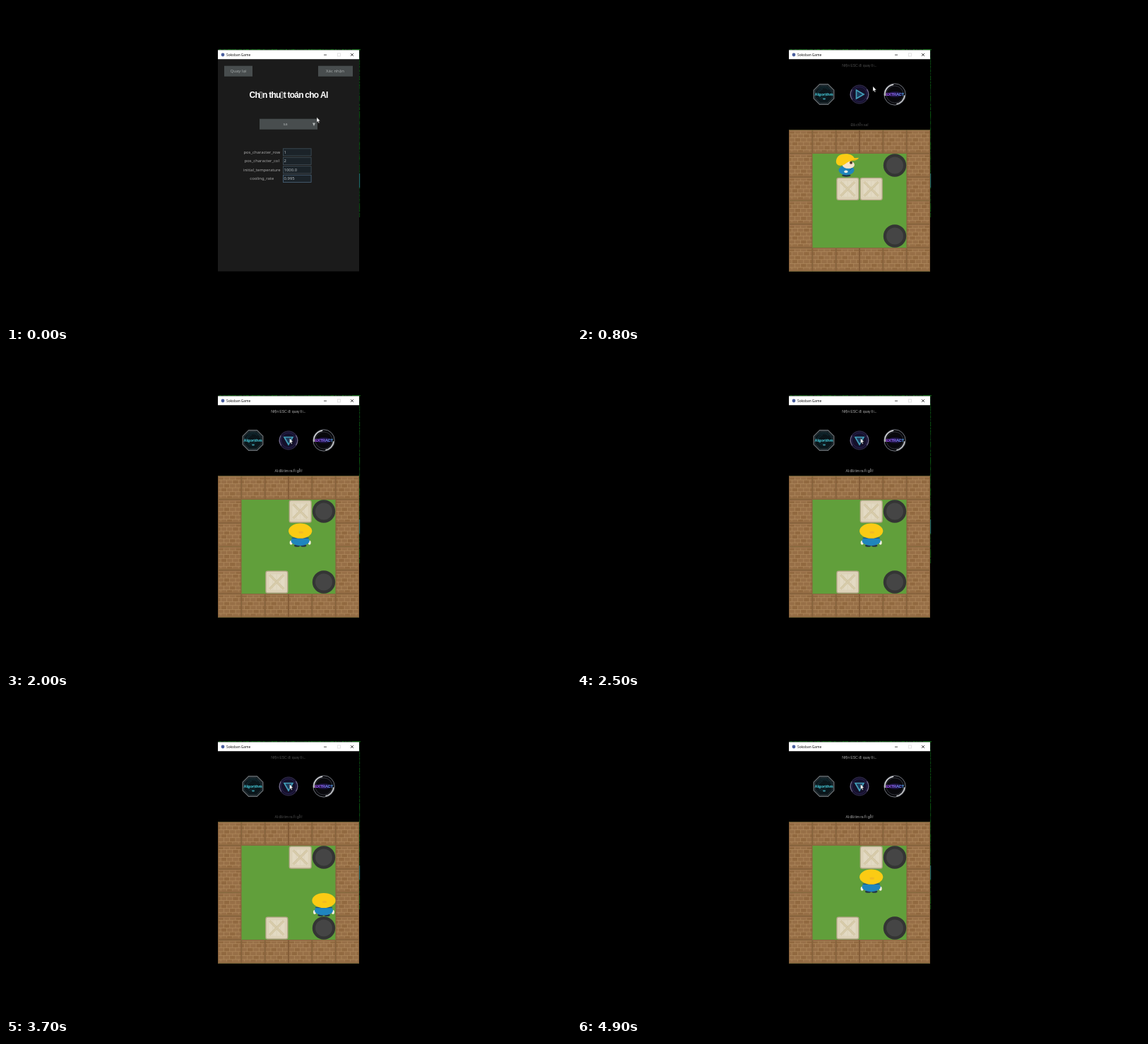
An HTML page with a canvas for the animation above (5000 ms loop, 800 px wide and 450 px high).

```html
<!DOCTYPE html>
<html lang="vi">
<head>
<meta charset="utf-8">
<title>Sokoban</title>
<style>
html, body { margin: 0; width: 100%; height: 100%; overflow: hidden; background: #000; }
canvas { display: block; }
</style>
</head>
<body>
<canvas id="stage" width="800" height="450"></canvas>
<script>
const c = document.getElementById('stage').getContext('2d');
const LOOP = 5000, TILE = 100 / 3, LEFT = 300, TOP = 175.5;
const UI = '"Noto Sans", sans-serif', ARIAL = '"Liberation Sans", Arial, sans-serif';
const GAME_AT = 500, PLAY_AT = 900, FIRST_MOVE = 925, MOVE_EVERY = 285;
const MOVES = 'DDRUDURDDUUDLU';
const DIRS = { U: [0, -1], D: [0, 1], L: [-1, 0], R: [1, 0] };
// time, x, y of the pointer tip
const POINTER = [[0, 440, 157.5], [350, 465, 91], [500, 465, 91], [800, 419, 113.7], [900, 401.5, 122]];

function rect(x, y, w, h, color) {
  c.fillStyle = color;
  c.fillRect(x, y, w, h);
}

function roundRect(x, y, w, h, r, color) {
  c.fillStyle = color;
  c.beginPath();
  c.roundRect(x, y, w, h, r);
  c.fill();
}

function ellipse(x, y, rx, ry, color, from = 0, to = 2 * Math.PI) {
  c.fillStyle = color;
  c.beginPath();
  c.ellipse(x, y, rx, ry, 0, from, to);
  c.fill();
}

function poly(points, fill, stroke, width = 1) {
  c.beginPath();
  points.forEach(([x, y]) => c.lineTo(x, y));
  c.closePath();
  if (fill) { c.fillStyle = fill; c.fill(); }
  if (stroke) { c.strokeStyle = stroke; c.lineWidth = width; c.stroke(); }
}

function line(x1, y1, x2, y2, color, width) {
  c.strokeStyle = color;
  c.lineWidth = width;
  c.beginPath();
  c.moveTo(x1, y1);
  c.lineTo(x2, y2);
  c.stroke();
}

function ring(x, y, r, color, width, from = 0, to = 2 * Math.PI) {
  c.strokeStyle = color;
  c.lineWidth = width;
  c.beginPath();
  c.arc(x, y, r, from, to);
  c.stroke();
}

function text(s, x, y, font, color, align = 'center') {
  c.font = font;
  c.fillStyle = color;
  c.textAlign = align;
  c.textBaseline = 'alphabetic';
  c.fillText(s, x, y);
}

// Centred text in which every ▯ is a missing-glyph box
function boxedText(s, x, y, size, weight, spacing, color) {
  const font = `${weight} ${size}px ${ARIAL}`, box = size * .34;
  c.font = font;
  c.letterSpacing = spacing + 'px';
  const parts = s.split('▯'), widths = parts.map(p => c.measureText(p).width);
  x -= (widths.reduce((a, b) => a + b) + box * (parts.length - 1)) / 2;
  parts.forEach((p, i) => {
    if (i) {
      c.strokeStyle = color;
      c.lineWidth = size * .05;
      c.strokeRect(x + .3, y - size * .7, box - 1, size * .7);
      x += box;
    }
    text(p, x, y, font, color, 'left');
    x += widths[i];
  });
  c.letterSpacing = '0px';
}

function windowFrame() {
  let seed = 7;
  const rnd = () => (seed = seed * 16807 % 2147483647) / 2147483647;
  for (let x = 300; x < 501; x += 2) rect(x, 61, 2, 1.5, `rgb(14,${35 + rnd() * 70},18)`);
  for (let y = 63; y < 298; y += 2) {
    const teal = y > 236 && y < 256;
    rect(500, y, 1.2, 2, teal ? '#1d6a66' : `rgb(8,${20 + rnd() * 60},14)`);
  }
  rect(300, 62.4, 200, 13.1, '#fff');
  ellipse(307, 69, 2.4, 2.4, '#4a5f9e');
  text('Sokoban Game', 312, 70.9, '4.8px ' + UI, '#111', 'left');
  line(450, 69.2, 454, 69.2, '#222', .8);
  c.strokeStyle = '#ddd';
  c.strokeRect(469.5, 67, 4, 4);
  line(488, 67, 492, 71, '#222', .8);
  line(492, 67, 488, 71, '#222', .8);
}

function button(s, x, y, w, textX) {
  rect(x, y, w, 15, '#484d4e');
  text(s, textX, y + 9.6, '6px ' + UI, '#a5abab');
}

function settings() {
  rect(300, 75.5, 200, 300, '#1b1b1b');
  button('Quay lại', 309, 84.7, 40, 329);
  button('Xác nhận', 442, 84.7, 49, 466);
  boxedText('Ch▯n thu▯t toán cho AI', 400, 130.3, 12, 'bold', -.76, '#fff');
  button('sa', 359, 159.7, 82, 395.5);
  poly([[434, 165.5], [438, 165.5], [436, 170]], '#b5baba');
  [['pos_character_row', '1'], ['pos_character_col', '2'],
   ['initial_temperature', '1000.0'], ['cooling_rate', '0.995']].forEach(([name, value], i) => {
    const y = 201.4 + i * 12.45;
    text(name, 362.3, y + 7.6, '5.9px ' + UI, '#a8a8a8');
    rect(392, y, 40.5, 11, i == 3 ? '#4d6880' : '#42505a');
    rect(392.8, y + .8, 38.9, 9.4, '#1b2329');
    text(value, 393.6, y + 7.6, '5.9px ' + UI, '#b5bcc0', 'left');
  });
}

function icons(playing) {
  const octagon = r => Array.from({ length: 8 }, (_, i) => {
    const a = (i + .5) * Math.PI / 4;
    return [349.5 + r * Math.cos(a), 125 + r * Math.sin(a)];
  });
  poly(octagon(15.4), '#0a151a', '#63686c', 1.4);
  poly(octagon(13.2), null, '#2d373c', 1);
  for (let i = 0; i < 5; i++) ring(349.5, 125, 4 + i * 1.8, '#1b434c', .5, i, i + 2.5);
  text('Algorithm', 349.6, 127, `bold 5.5px ${ARIAL}`, '#49d3e2');
  ellipse(350, 131.5, 2, 1, '#3f9ba8');

  ellipse(400, 125, 13.4, 13.4, '#14102a');
  ring(400, 125, 12.8, '#2c2742', 1.2);
  ring(400, 125, 12.6, '#777090', 1.1, -.6, .6);
  ring(400, 125, 12.6, '#777090', 1.1, 2.5, 3.7);
  ring(400, 125, 10.5, '#2a2252', 1);
  c.save();
  c.translate(400, 125);
  if (playing) c.rotate(Math.PI / 2);
  poly([[-4.5, -6], [6, 0], [-4.5, 6]], '#1c3a5c', '#439fb8', 1.7);
  c.restore();

  ellipse(450, 125, 15.8, 15.8, '#08080c');
  ring(450, 125, 15.2, '#70747a', 1);
  ring(450, 125, 14, '#d5d7db', 1.6, -3.3, -1.7);
  ring(450, 125, 14, '#c8cace', 1.6, .1, 1.4);
  ring(450, 125, 12, '#34363e', .9);
  const glow = c.createLinearGradient(438, 0, 462, 0);
  glow.addColorStop(0, '#a64af0');
  glow.addColorStop(.5, '#8a6cf8');
  glow.addColorStop(1, '#4fa8f0');
  ellipse(450, 125, 11, 4, '#1d1440');
  c.letterSpacing = '-.4px';
  text('EXTRACT', 450, 127.2, `bold 6px ${ARIAL}`, glow);
  c.letterSpacing = '0px';
}

function wall(x, y) {
  c.save();
  c.beginPath();
  c.rect(x, y, TILE, TILE);
  c.clip();
  rect(x, y, TILE, TILE, '#ae885c');
  const h = TILE / 6, w = TILE / 4;
  for (let r = 0; r < 6; r++)
    for (let i = -1; i < 5; i++)
      rect(x + (i + r % 2 / 2) * w + .4, y + r * h + .4, w - .8, h - .8, (r + i) % 3 ? '#976f47' : '#916940');
  c.strokeStyle = '#815b38';
  c.lineWidth = 1.8;
  c.strokeRect(x, y, TILE, TILE);
  rect(x + 1, y + 1, TILE - 2, 1.4, '#a07850');
  rect(x + 1, y + TILE - 2.6, TILE - 2, 1.7, '#936c44');
  c.restore();
}

function crate(col, row) {
  const x = LEFT + col * TILE + .6, y = TOP + row * TILE + .6, s = 32.2;
  roundRect(x, y, s, s, 3.2, '#b3a687');
  roundRect(x + 1.3, y + 1.3, s - 2.6, s - 2.6, 2.2, '#ddd2b8');
  rect(x + 5, y + 5, s - 10, s - 10, '#e3dac3');
  for (let i = 1; i < 4; i++) line(x + 5 + i * 5.5, y + 5, x + 5 + i * 5.5, y + s - 5, '#dad0b7', .7);
  for (const [a, b] of [[6, 26], [26, 6]]) {
    line(x + a, y + 6, x + b, y + 26, '#cdc19f', 3.2);
    line(x + a, y + 6, x + b, y + 26, '#d8ccab', 2);
  }
}

function goal(col, row) {
  const x = LEFT + (col + .5) * TILE, y = TOP + (row + .5) * TILE;
  ellipse(x, y, 16.2, 16.2, '#343534');
  ellipse(x, y, 12, 12, '#454545');
}

function sideCap() {
  c.fillStyle = '#fbcb14';
  c.beginPath();
  c.moveTo(-16.5, 11);
  c.bezierCurveTo(-16, 3, -10, .3, -3, .3);
  c.bezierCurveTo(4, .3, 8, 3, 9.5, 6.5);
  c.lineTo(15.5, 6);
  c.bezierCurveTo(14.5, 10, 8, 10, 3, 11);
  c.bezierCurveTo(-2, 12.5, -4, 17, -10, 17);
  c.bezierCurveTo(-14, 17, -16.5, 15, -16.5, 11);
  c.fill();
}

function worker(col, row, dir) {
  c.save();
  c.translate(LEFT + (col + .5) * TILE, TOP + row * TILE);
  if (dir == 'L') c.scale(-1, 1);
  if (dir == 'L' || dir == 'R') {
    ellipse(-2, 30.8, 6.2, 2.1, '#24384a');
    ellipse(-1.8, 23.5, 11, 6.8, '#1f85bd');
    ellipse(1, 15.8, 8.6, 5.4, '#f6e3ca');
    sideCap();
    ellipse(4.7, 13, 2, 2, '#4a3a2c');
    line(4, 10.3, 14, 7.5, '#e0a214', .9);
    ellipse(-2.5, 25.5, 2.6, 1.9, '#f0eee6');
    line(1.5, 25, 6, 20.5, '#175d8c', 1);
  } else {
    ellipse(-4.5, 31.8, 4.2, 1.8, '#24384a');
    ellipse(4.5, 31.8, 4.2, 1.8, '#24384a');
    ellipse(-13, 27.5, 2, 3, '#f5efe2');
    ellipse(13, 27.5, 2, 3, '#f5efe2');
    ellipse(0, 25, 13, 7, '#1f85bd');
    if (dir == 'D') {
      ellipse(0, 17, 11, 6.5, '#f6dfc3');
      ellipse(-4, 17, 1.5, 2, '#35302d');
      ellipse(4, 17, 1.5, 2, '#35302d');
      ellipse(0, 11, 15, 10.5, '#fbcb14', Math.PI, 2 * Math.PI);
      ellipse(0, 11.5, 16, 3.4, '#f0bb10');
    } else {
      line(-12, 21, 12, 21, '#24506e', 1.2);
      ellipse(0, 11, 16.6, 10.6, '#fbcb14');
      ellipse(1, 13, 3.2, 1.6, '#f2ba22');
    }
  }
  c.restore();
}

function boardAt(t) {
  const man = { x: 2, y: 1, dir: 'R' }, crates = [[2, 2], [3, 2]];
  const count = Math.floor((t - FIRST_MOVE) / MOVE_EVERY) + 1;
  for (const dir of MOVES.slice(0, Math.max(0, count))) {
    const [dx, dy] = DIRS[dir];
    man.x += dx;
    man.y += dy;
    man.dir = dir;
    const hit = crates.find(([x, y]) => x == man.x && y == man.y);
    if (hit) { hit[0] += dx; hit[1] += dy; }
  }
  return { man, crates };
}

function game(t) {
  rect(300, 75.5, 200, 100, '#000');
  const pulse = .5 - .5 * Math.cos((t - 800) / 2900 * 2 * Math.PI);
  const grey = 75 + 95 * Math.min(1, pulse * 1.6), color = `rgb(${grey},${grey},${grey})`;
  boxedText('Nh▯n ESC đ▯ quay l▯i...', 399.7, 86.2, 5.3, 'normal', -.2, color);
  boxedText(t < PLAY_AT ? 'Đã ch▯n sa!' : 'AI đã tìm ra l▯i gi▯i!', 400, 169.5, 5.3, 'normal', -.2, color);
  icons(t >= PLAY_AT);
  rect(LEFT, TOP, 200, 200, '#619f3b');
  for (let row = 0; row < 6; row++)
    for (let col = 0; col < 6; col++)
      if (row % 5 == 0 || col % 5 == 0) wall(LEFT + col * TILE, TOP + row * TILE);
  goal(4, 1);
  goal(4, 4);
  const { man, crates } = boardAt(t);
  crates.forEach(p => crate(...p));
  worker(man.x, man.y, man.dir);
}

function pointer(t) {
  let i = 1;
  while (i < POINTER.length - 1 && POINTER[i][0] < t) i++;
  const [t0, x0, y0] = POINTER[i - 1], [t1, x1, y1] = POINTER[i];
  const k = Math.min(1, (t - t0) / (t1 - t0));
  c.save();
  c.translate(x0 + (x1 - x0) * k, y0 + (y1 - y0) * k);
  poly([[0, 0], [0, 7], [1.5, 5.7], [2.6, 8.2], [3.7, 7.7], [2.7, 5.3], [4.8, 5.1]], '#fff', '#222', .4);
  c.restore();
}

function draw(now) {
  const t = Math.floor(now % LOOP / 100) * 100;
  rect(0, 0, 800, 450, '#000');
  windowFrame();
  if (t < GAME_AT) settings(); else game(t);
  pointer(t);
  requestAnimationFrame(draw);
}
draw(0);
</script>
</body>
</html>
```
